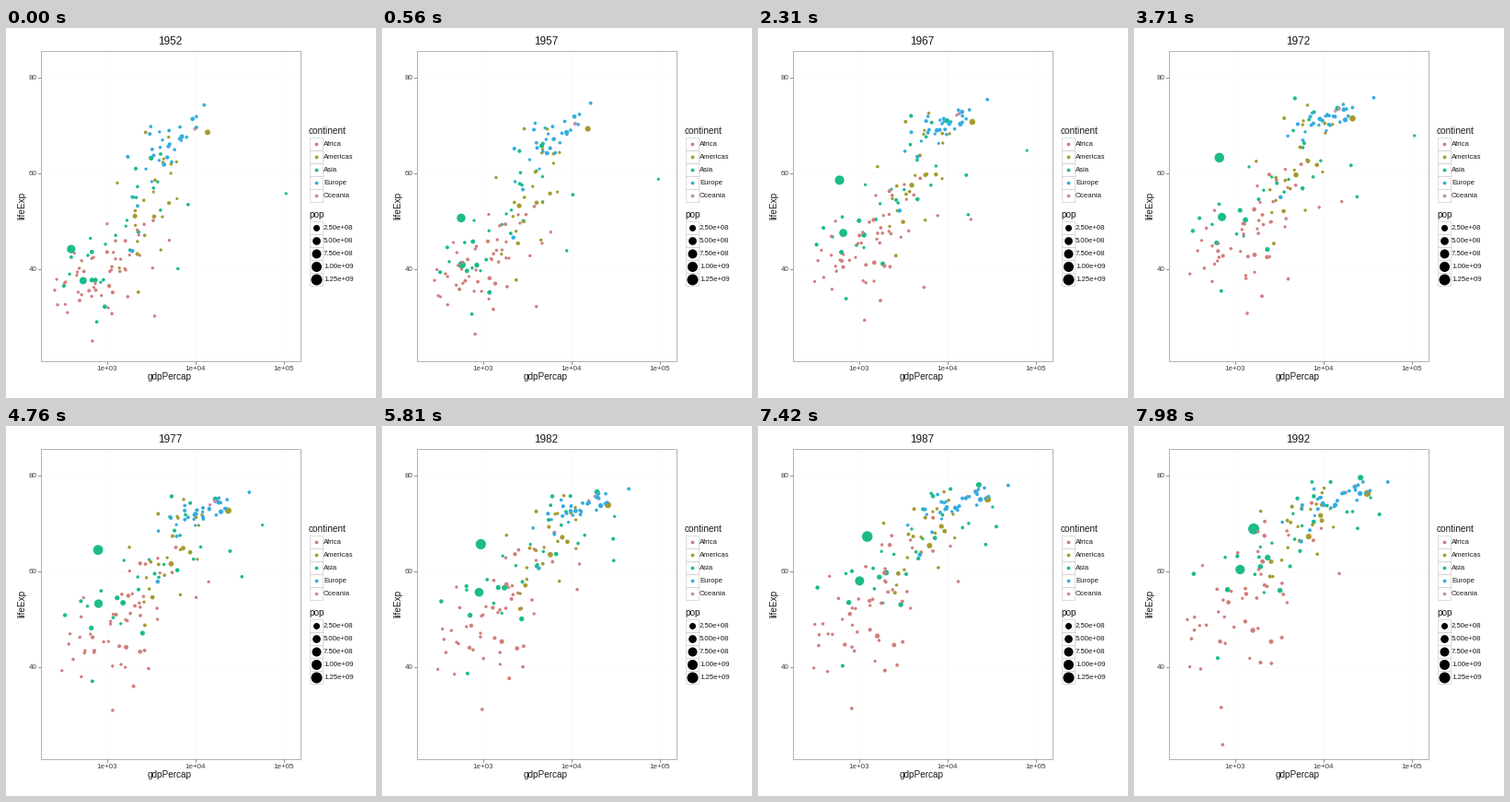
Animation of 402x402 px, one loop 8 s. Source, as a matplotlib script:

```python
import matplotlib.pyplot as plt
import numpy as np
from matplotlib.animation import FuncAnimation
from matplotlib.patches import Rectangle

SIZE, DPI = 402, 64
PT = 72 / DPI                      # points per pixel
LOOP, STEP = 8000, 20              # ms
HOLD, FIRST_CUT = 1050, 210        # ms per year, ms of the first change
YEARS = np.arange(1952, 1993, 5)
LEFT, RIGHT, TOP, BOTTOM = 37.5, 319.5, 24.5, 361.5
COLORS = {"Africa": "#d17f7b", "Americas": "#a59b2f", "Asia": "#1dbb8a",
          "Europe": "#35ace0", "Oceania": "#c48fb2"}
GROWTH = {"Africa": .026, "Americas": .021, "Asia": .0185, "Europe": .005,
          "Oceania": .015}

plt.rcParams["font.family"] = "Liberation Sans"
rng = np.random.default_rng(7)
paths, areas, colors = [], [], []


def to_x(log_gdp):
    return 109 + 96 * (log_gdp - 3)


def to_y(life):
    return 261 - 5.2 * (life - 40)


def diameter(pop):
    """Dot width in pixels for a population in millions."""
    return 3 + 9.25 * np.sqrt(pop / 1319)


def area(d):
    return (d * PT) ** 2


def add_dot(name, pop, years, log_gdp, life):
    """Add one country that moves evenly between its key years."""
    paths.append([np.interp(YEARS, years, to_x(log_gdp)),
                  np.interp(YEARS, years, to_y(life))])
    areas.append(area(diameter(pop * np.exp(GROWTH[name] * (YEARS - 1972)))))
    colors.append(COLORS[name])


def country(name, pop, *keys):
    """keys are year, gdp, life triples."""
    year, gdp, life = np.reshape(keys, (-1, 3)).T
    add_dot(name, pop, year + 1900, np.log10(gdp), life)


def spread(n):
    """Random values with mean 0 and deviation 1."""
    v = np.clip(rng.normal(size=n), -2.1, 2.1)
    return (v - v.mean()) / v.std()


def cloud(name, n, pop, rho, *stats):
    """Correlated scatter; stats are mean and deviation of log gdp and of
    life expectancy at three years, twenty years apart."""
    stats = np.reshape(stats, (3, 4))
    rich, well = spread(n), spread(n)
    pops = pop * np.exp(spread(n))
    wander = rng.normal(0, .25, (n, 2, 3))
    for i in range(n):
        zx = rich[i] + wander[i, 0]
        zy = rho * rich[i] + np.sqrt(1 - rho ** 2) * well[i] + wander[i, 1]
        add_dot(name, pops[i], YEARS[::4], stats[:, 0] + stats[:, 1] * zx,
                np.minimum(stats[:, 2] + stats[:, 3] * zy, 78.5))


country("Asia", 862, 52, 400, 44, 57, 576, 50.5, 62, 488, 44.5,
        67, 613, 58.4, 72, 677, 63.1, 82, 962, 65.5, 92, 1656, 68.7)
country("Asia", 567, 52, 547, 37.4, 72, 724, 50.7, 92, 1164, 60.2)
country("Asia", 121, 52, 750, 37.5, 92, 2383, 62.7)
country("Asia", 107, 52, 3217, 63, 72, 14779, 73.4, 92, 26825, 79.4)
country("Asia", 71, 52, 684, 37.5, 72, 630, 45.3, 92, 838, 56)
country("Asia", 69, 52, 685, 43.4, 92, 1972, 60.8)
country("Asia", 28, 52, 331, 36.3, 92, 347, 59.3)
country("Asia", 13, 52, 779, 28.8, 92, 649, 41.7)
country("Asia", 6, 52, 6460, 39.9, 77, 34168, 58.7, 92, 24842, 68.8)
country("Asia", 1, 52, 108382, 55.6, 67, 80895, 64.6, 72, 109348, 67.7,
        82, 31354, 71.3, 92, 34933, 75.2)
cloud("Asia", 23, 8, .72,
      3.2, .31, 48.5, 8.5, 3.5, .42, 59, 8.5, 3.7, .43, 68, 6)

country("Africa", 54, 52, 1077, 36.3, 72, 1698, 42.8, 92, 1620, 47.5)
country("Africa", 6, 52, 3521, 30, 67, 5523, 36, 77, 3009, 39.5,
        92, 2628, 40.6)
country("Africa", 2, 52, 2388, 42.7, 67, 18773, 50.2, 92, 9640, 68.8)
country("Africa", 4, 52, 493, 40, 87, 848, 44, 92, 737, 23.6)
cloud("Africa", 48, 4, .5,
      2.99, .29, 39.2, 5, 3.16, .32, 47.6, 6.2, 3.14, .37, 54, 8)

country("Americas", 210, 52, 13990, 68.4, 72, 21806, 71.3, 92, 32004, 76.1)
country("Americas", 101, 52, 2109, 50.9, 72, 4986, 59.5, 92, 6950, 67.1)
country("Americas", 56, 52, 3478, 50.8, 72, 6809, 62.4, 92, 9472, 71.5)
cloud("Americas", 22, 5, .6,
      3.52, .2, 53.3, 8.8, 3.7, .22, 62.4, 7.3, 3.75, .24, 69.5, 5)

country("Oceania", 13, 52, 10040, 69.1, 92, 23425, 77.6)
country("Oceania", 3, 52, 10557, 69.4, 92, 18363, 76.3)

country("Europe", 37, 52, 1969, 43.6, 92, 5678, 66.1)
country("Europe", 79, 52, 7144, 67.5, 72, 18016, 71, 92, 26505, 76.1)
cloud("Europe", 28, 8, .8,
      3.69, .23, 65, 4.6, 4.04, .21, 71.2, 1.9, 4.16, .26, 74.8, 2.6)

positions = np.array(paths).transpose(2, 0, 1)
areas = np.array(areas).T

fig = plt.figure(figsize=(SIZE / DPI, SIZE / DPI), dpi=DPI, facecolor="white")
ax = fig.add_axes([0, 0, 1, 1])
ax.set(xlim=(0, SIZE), ylim=(SIZE, 0))
ax.axis("off")


def text(x, y, s, px, color="#1a1a1a", ha="left", va="center_baseline", **kw):
    return ax.text(x, y, s, fontsize=px * PT, color=color, ha=ha, va=va, **kw)


def line(x, y, color):
    ax.plot(x, y, color=color, lw=.8 * PT, zorder=1)


def box(x, y, w, h, color):
    ax.add_patch(Rectangle((x, y), w, h, fill=False, ec=color, lw=.8 * PT,
                           zorder=2))


def key(y, d, color, label):
    box(329.5, y - 6.5, 14, 14, "#d4d4d4")
    ax.scatter([336.5], [y + .5], s=area(d), c=[color], linewidths=0, zorder=3)
    text(345, y + .5, label, 7.7)


# Panel, grid and axes
for power in (3, 4, 5):
    x = to_x(power) + .5
    line([x, x], [TOP, BOTTOM], "#fafafa")
    line([x, x], [BOTTOM, BOTTOM + 3], "#777777")
    text(x, 369, f"1e+{power:02d}", 8, "#404040", ha="center")
for life in (40, 60, 80):
    y = to_y(life) + .5
    line([LEFT, RIGHT], [y, y], "#fafafa")
    line([LEFT - 3, LEFT], [y, y], "#777777")
    text(33.5, y, str(life), 8, "#404040", ha="right")
box(LEFT, TOP, RIGHT - LEFT, BOTTOM - TOP, "#a0a0a0")
text(178, 382.5, "gdpPercap", 10, ha="center", va="baseline")
text(17, 193, "lifeExp", 10, ha="center", va="center", rotation=90)

# Legends
text(329, 115, "continent", 10, va="baseline")
text(329, 205.5, "pop", 10, va="baseline")
for i, (name, color) in enumerate(COLORS.items()):
    key(125 + 14 * i, 3.8, color, name)
    pop = 250 * (i + 1)
    key(216 + 14 * i, diameter(pop), "black", f"{pop * 1e6:.2e}")

title = text(178, 18.5, "", 11.7, ha="center", va="baseline")
dots = ax.scatter(*positions[0].T, s=areas[0], c=colors, linewidths=0, zorder=4)


def draw(frame):
    t = frame * STEP + STEP / 2
    k = int((t - FIRST_CUT) // HOLD) + 1
    title.set_text(str(YEARS[k]))
    dots.set_offsets(positions[k])
    dots.set_sizes(areas[k])
    return title, dots


anim = FuncAnimation(fig, draw, frames=LOOP // STEP, interval=STEP,
                     repeat=True, repeat_delay=0, blit=False)
plt.show()
```
